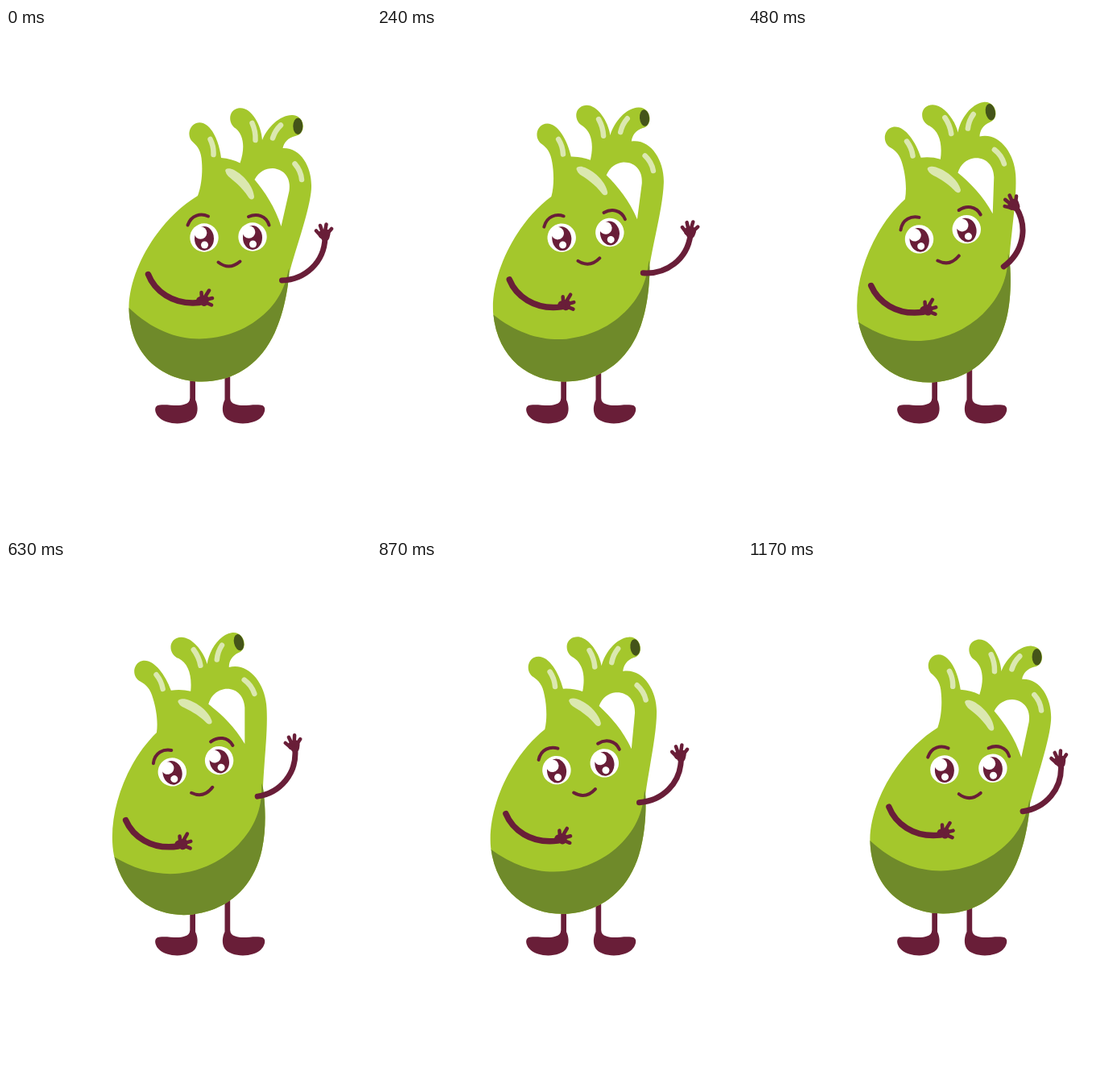
Animation, 453 px wide and 625 px high, one loop 1200 ms. Source, as an HTML page:

```html
<!DOCTYPE html>
<html lang="en">
<head>
<meta charset="utf-8">
<title>Waving character</title>
<style>
  html, body { margin: 0; width: 100%; height: 100%; overflow: hidden; background: #fff; }
  svg { display: block; width: 100vw; height: 100vh; }
  .line { fill: none; stroke: #691e38; stroke-linecap: round; stroke-linejoin: round; }
  .dark { fill: #691e38; }
  .shine { fill: none; stroke: #dbe8b0; stroke-linecap: round; }
</style>
</head>
<body>
<svg viewBox="0 0 453 625">
  <defs>
    <path id="shape" d="M243 438.500C197 438.500 152.500 408 152.500 345C154 297 190 237 238 208
      C243 195 244 178 243 166C242.500 153 238 147 232.500 142C224.500 136 226 122 236 118
      C252 113 264 137 267 161Q280 162 290.500 167.500C297 148 295 133 285 124.500
      C275 118 276 102 288 99.500C303 96 317 119 318 139C324 123 341 107 356 108
      C372 109 373 132 359 134C350 136 345 142 343.500 149C368 148 382 177 378.500 204
      C375 232 360 272 351.500 304C350 322 345.500 352 333.500 378C315 418 282 438.500 243 438.500Z"/>
    <clipPath id="inside"><use href="#shape"/></clipPath>
    <g id="leg" class="dark">
      <path d="M228.300 415H235V461C238 467 239 476 235 482C227 493 200 493 190 483
        C184 477 183 468 191 467.500C203 466.500 213 470 222 466.500Q228 465 228.300 459Z"/>
    </g>
    <g id="eye">
      <circle r="17.700" fill="#fff"/>
      <ellipse cy="1" rx="12" ry="15" class="dark"/>
      <circle cx="-4.500" cy="-6" r="7.800" fill="#fff"/>
      <circle cx=".5" cy="9" r="4.500" fill="#fff"/>
    </g>
  </defs>

  <use href="#leg"/>
  <use href="#leg" transform="matrix(-1 0 0 1 506.500 0)"/>

  <g id="body">
    <use href="#shape" fill="#a4c72c"/>
    <path clip-path="url(#inside)" fill="#6f8a2a"
      d="M150 344.500C180 374 210 385 240 385.500C270 385 292 375 306 366C333 348 346 326 351 298L365 450H140Z"/>
    <path fill="#fff" d="M308.500 188C314 178 322 174 331 174C346 175 354 187 351.500 202L341.500 246C334 222 321 203 308.500 188Z"/>
    <ellipse cx="362.300" cy="121.700" rx="6" ry="10.300" fill="#445419"/>

    <path fill="#dbe8b0" d="M272.500 178C271 174 277 173 283 176C296 183 307 197 308 209C308 213 304 214 301 210C292 196 283 190 276 184Q273 181 272.500 178Z"/>
    <g class="shine" stroke-width="6.500">
      <path d="M253.500 138Q258 147 257.500 157"/>
      <path d="M305.500 118Q310 128 309.500 139"/>
      <path d="M341 120.500Q334 127 331 136.500"/>
      <path d="M358.500 168.500Q366 177 367 188"/>
    </g>

    <use href="#eye" x="246" y="260"/>
    <use href="#eye" x="306" y="259"/>
    <g class="line" stroke-width="4">
      <path d="M225.500 244.500C230 231.500 242 229.500 251 233.500"/>
      <path d="M301 234C311 229.500 323 232.500 326.500 244.500"/>
      <path d="M263.500 290.500Q277 301 290.500 289.500"/>
    </g>

    <g id="rest" class="line">
      <path stroke-width="7.500" d="M176.500 305.500C184 325 206 344 240 340.500"/>
      <path stroke-width="10" d="M241 338L247 336.500L246 340"/>
      <path stroke-width="4.500" d="M243 336L242.500 328M246 335L252 325.500M248 337L256 335M247 340L255 343.500"/>
    </g>

    <g id="wave" class="line">
      <path stroke-width="7" d="M342.500 313C371 312 395 291 396 260"/>
      <path stroke-width="11" d="M393 256L397 255L396 259"/>
      <path stroke-width="4.500" d="M391 258L385 251.500M393 254L390 245M396 252L397.500 243.500M398 256L404 249"/>
    </g>
  </g>
</svg>
<script>
  const LOOP = 1200, STEP = 30;
  const [body, rest, wave] = ["body", "rest", "wave"].map(id => document.getElementById(id));
  const turn = (el, deg, x, y) => el.setAttribute("transform", `rotate(${deg} ${x} ${y})`);
  // Triangle wave: 0, 1, 0, -1 at each quarter
  const tri = p => Math.asin(Math.sin(2 * Math.PI * p)) * 2 / Math.PI;

  function draw(now) {
    const t = Math.floor((now % LOOP) / STEP) * STEP;
    const lean = 1 - Math.abs(1 - 2 * t / LOOP);
    turn(body, -13.5 * lean, 239, 438);
    turn(rest, 11 * lean, 176.5, 305.5);
    turn(wave, 28.5 * tri(2 * t / LOOP), 342.5, 313);
  }

  const start = performance.now();
  function tick() {
    draw(performance.now() - start);
    requestAnimationFrame(tick);
  }
  tick();
</script>
</body>
</html>
```
